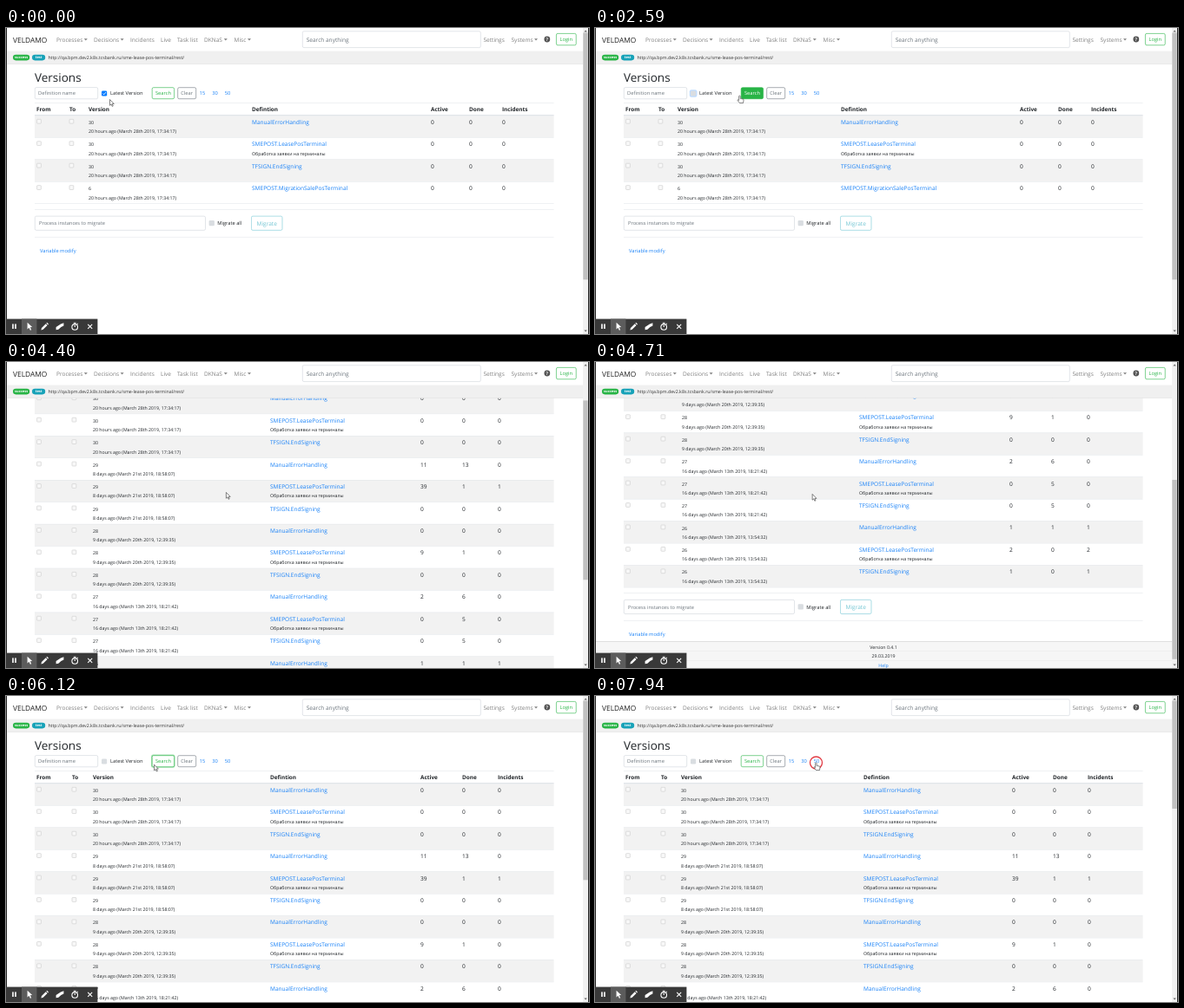
An HTML page that plays this animation: 671x353 px, repeating every 8000 ms.

```html
<!DOCTYPE html>
<html lang="en">
<head>
<meta charset="utf-8">
<title>Versions</title>
<style>
html, body { margin: 0; width: 100%; height: 100%; overflow: hidden; background: #fff; }
svg { display: block; width: 671px; height: 353px; font-family: "Open Sans", "Noto Sans", sans-serif; text-rendering: geometricPrecision; }
</style>
</head>
<body>
<svg id="stage" viewBox="0 0 671 353"></svg>
<script>
const stage = document.getElementById('stage');
const LOOP = 8000;
const INK = '#212529', MUTED = '#6c757d', NAV = '#808080', BLUE = '#1a82f7', GREEN = '#28b446', TEAL = '#17a2b8', LINE = '#dee2e6';
const LG = 6.55, MD = 5.73, SM = 5.25;
const ROW = 25.45, SHORT = 15.05, TOP = 100.7;

// Screen refreshes: runs of evenly spaced steps [first, last, count].
const runs = [[0, 0, 1], [100, 160, 2], [430, 430, 1], [1090, 1090, 1], [1940, 2930, 7], [3080, 4100, 8],
  [4240, 5150, 7], [5380, 6400, 8], [6600, 7610, 8], [7790, 7940, 2]];
const steps = runs.flatMap(([a, b, n]) => Array.from({ length: n }, (_, i) => n > 1 ? Math.round(a + (b - a) * i / (n - 1)) : a));

const cursorKeys = [[0, 119.5, 82.5], [100, 140, 120], [160, 162, 161], [430, 113, 76], [2105, 113, 76], [2430, 166, 78],
  [2590, 184, 77], [3080, 183, 77], [3370, 200, 95], [3810, 256, 148], [4100, 256.5, 148.5], [4710, 250, 152.5],
  [5150, 252, 158], [5380, 260.5, 176.5], [5680, 255, 165], [5980, 195, 98], [6120, 168.5, 77.5], [6400, 234, 76],
  [6600, 240, 76], [7610, 240, 76], [7790, 254.5, 77], [8000, 254.5, 77]];
const scrollKeys = [[4240, 0], [4400, 70], [4550, 170], [4700, 224.5], [4870, 224.5], [5010, 185], [5150, 105], [5380, 18], [5530, 0]];
const clicks = [1940, 2770, 6600, 7790];

const views = {
  latest: { cols: [35, 73, 95, 283, 489, 533, 571], rows: 4, dates: true },
  plain: { cols: [35, 89, 121, 195, 426, 489, 544], rows: 15 },
  full: { cols: [35, 76, 100, 304, 477, 525, 566], rows: 15, dates: true },
  plainLong: { cols: [35, 89, 121, 195, 426, 489, 544], rows: 30 },
  fullLong: { cols: [35, 76, 99, 309, 480, 527, 567], rows: 30, dates: true }
};
const heads = ['From', 'To', 'Version', 'Defintion', 'Active', 'Done', 'Incidents'];
const names = ['ManualErrorHandling', 'SMEPOST.LeasePosTerminal', 'TFSIGN.EndSigning'];
const dates = ['20 hours ago (March 28th 2019, 17:34:17)', '8 days ago (March 21st 2019, 18:58:07)',
  '9 days ago (March 20th 2019, 12:39:35)', '16 days ago (March 13th 2019, 18:21:42)', '16 days ago (March 13th 2019, 13:54:32)'];
const counts = { 3: [11, 13, 0], 4: [39, 1, 1], 7: [9, 1, 0], 9: [2, 6, 0], 10: [0, 5, 0], 11: [0, 5, 0], 12: [1, 1, 1], 13: [2, 0, 2], 14: [1, 0, 1] };

function track(keys, t) {
  if (t <= keys[0][0]) return keys[0].slice(1);
  for (let i = 1; i < keys.length; i++) {
    const a = keys[i - 1], b = keys[i];
    if (t <= b[0]) return a.slice(1).map((v, k) => v + (b[k + 1] - v) * (t - a[0]) / (b[0] - a[0]));
  }
  return keys[keys.length - 1].slice(1);
}

// y is the middle of the capitals.
const text = (x, y, s, size = LG, fill = INK, more = '') =>
  `<text x="${x}" y="${(y + size * .36).toFixed(2)}" font-size="${size}" fill="${fill}" ${more}>${s}</text>`;
const mid = (x, y, s, size, fill, more = '') => text(x, y, s, size, fill, 'text-anchor="middle" ' + more);
const rect = (x, y, w, h, fill, more = '') => `<rect x="${x}" y="${y}" width="${w}" height="${h}" fill="${fill}" ${more}/>`;
const path = (d, fill, more = '') => `<path d="${d}" fill="${fill}" ${more}/>`;
const outline = (x, y, w, h, color, fill = '#fff', r = 1.6) => rect(x, y, w, h, fill, `rx="${r}" stroke="${color}" stroke-width=".6"`);
const hline = (y, h = .5, color = LINE) => rect(33, y, 597.5, h, color);
const caret = (x, y) => path(`M${x - 2} ${y - 1}h4l-2 2.2z`, NAV);
const tick = (x, y) => outline(x - 2.4, y - 2.4, 4.8, 4.8, '#c9c9c9', '#f8f8f8', .7);

function button(x, y, w, h, label, color, size, fill = '#fff') {
  return outline(x, y, w, h, color, fill) + mid(x + w / 2, y + h / 2, label, size, fill === '#fff' ? color : '#fff');
}

function table(view) {
  const c = view.cols, latest = view === views.latest;
  let y = TOP, out = hline(86, .5) + heads.map((s, i) => text(c[i], 93.3, s, 6.4, INK, 'font-weight="700"')).join('');
  for (let i = 0; i < view.rows; i++) {
    const old = latest && i === 3, lease = i % 3 === 1, line = y + 7.7;
    const group = latest ? 0 : Math.floor(i / 3);
    const h = view.dates || lease ? ROW : SHORT;
    if (i % 2 === 0) out += rect(33, y, 597.5, h, '#f2f2f2');
    out += hline(y, .45) + tick(38, line - .7) + tick(c[1] + 2.4, line - .7);
    out += text(c[2], line + .5, old ? 6 : 30 - group, SM);
    if (view.dates) out += text(c[2], y + 18.6, dates[Math.min(group, 4)], SM);
    out += text(c[3], line, old ? 'SMEPOST.MigrationSalePosTerminal' : names[i % 3], LG, BLUE);
    if (lease) out += text(c[3], y + 18.6, 'Обработка заявки на терминалы', SM);
    const nums = view.dates && !latest && counts[i] || [0, 0, 0];
    out += nums.map((n, k) => text(c[4 + k], line, n)).join('');
    y += h;
  }
  return { end: y, svg: out + hline(TOP - .5, .9) };
}

function filters(t) {
  const checked = t < 2105, ring = t >= 2105 && t < 2930;
  const focus = t >= 2930 && t < 6700, filled = t >= 2430 && t < 4240;
  let out = text(33, 57.6, 'Versions', 13.5, INK, 'font-weight="500"');
  out += outline(33.3, 68.6, 72.4, 13.2, '#ced4da') + text(37, 75.3, 'Definition name', MD, MUTED);
  if (ring) out += rect(108.8, 71.2, 8.6, 8.6, '#bfdcff', 'rx="2"');
  out += rect(110, 72.4, 6.2, 6.2, checked ? '#007bff' : '#d9dde1', 'rx="1.4"');
  if (checked) out += path('M111.4 75.5l1.3 1.3 2.3-2.7', 'none', 'stroke="#fff" stroke-width=".9"');
  out += text(120, 75.3, 'Latest Version', MD);
  if (focus) out += rect(167, 67.6, 27.6, 15.2, '#a5dfb1', 'rx="2.4"');
  out += button(168.2, 68.7, 25.4, 13, 'Search', GREEN, MD, filled ? GREEN : '#fff');
  out += button(197.7, 68.7, 21, 13, 'Clear', MUTED, MD);
  return out + [15, 30, 50].map((n, i) => text(222.8 + i * 14.5, 75.3, n, MD, BLUE)).join('');
}

function below(end, footer) {
  let out = hline(end, .5) + hline(end + 6.6, .5);
  out += outline(33.3, end + 14.6, 196.2, 16.2, '#ced4da') + text(38, end + 22.9, 'Process instances to migrate', MD, MUTED);
  out += rect(233.6, end + 19.5, 6.3, 6.3, '#d9dde1', 'rx="1.2"') + text(243.3, end + 22.8, 'Migrate all', MD);
  out += `<g opacity=".6">${button(282.4, end + 14.6, 35.6, 16.2, 'Migrate', TEAL, LG)}</g>`;
  out += hline(end + 38.4, .5) + text(39, end + 54.2, 'Variable modify', MD, BLUE);
  out += rect(1, footer, 663, 40, '#f6f6f6') + rect(1, footer, 663, .6, '#cfcfcf');
  ['Version 0.4.1', '29.03.2019', 'Help'].forEach((s, i) => {
    out += mid(332, footer + 6.6 + i * 10.5, s, SM, i === 2 ? BLUE : INK);
    if (i) out += rect(1, footer + .8 + i * 10.5, 663, .4, '#e2e2e2');
  });
  return out;
}

function topBar() {
  let out = rect(0, 0, 664, 27, '#fff') + rect(0, 26.6, 664, 15, '#f0f0f0') + rect(0, 41.2, 664, .5, '#dcdcdc');
  out += text(8, 13.6, 'VELDAMO', 8.4, '#222');
  const items = [[58, 'Processes', 91.8], [101, 'Decisions', 133.6], [143, 'Incidents'], [178, 'Live'], [197, 'Task list'],
    [228, 'DKNaS', 252.8], [262.5, 'Misc', 280], [549.5, 'Settings'], [581.5, 'Systems', 610]];
  for (const [x, s, arrow] of items) out += text(x, 13.3, s, LG, NAV) + (arrow ? caret(arrow, 13.2) : '');
  out += outline(341.3, 3.8, 205, 18.8, '#ced4da') + text(345.7, 13.5, 'Search anything', LG, MUTED);
  out += `<circle cx="622.8" cy="13" r="3.4" fill="#555"/>` + mid(622.8, 13, '?', 5.2, '#fff', 'font-weight="700"');
  out += button(633.4, 6.4, 22.8, 13.4, 'Login', GREEN, MD);
  out += rect(8, 30.8, 19.2, 6.6, GREEN, 'rx="3.3"') + mid(17.6, 34, 'success', 4, '#fff', 'font-weight="700"');
  out += rect(30, 30.8, 15.2, 6.6, TEAL, 'rx="3.3"') + mid(37.6, 34, 'test', 4, '#fff', 'font-weight="700"');
  return out + text(48.4, 34.2, 'http://qa.bpm.dev2.k8s.tcsbank.ru/sme-lease-pos-terminal/rest/', SM, '#333');
}

function scrollbar(y, height) {
  const k = 338 / height;
  return rect(664, 0, 6, 353, '#f1f1f1') + rect(664.3, 5.5 + y * k, 5.4, 353 * k, '#c1c1c1') +
    path('M665.4 4.6h3.4l-1.7-2zM665.4 348.4h3.4l-1.7 2z', '#666');
}

function recorder() {
  const white = '#fff', stroke = 'stroke="#fff" stroke-width="1.1"';
  return rect(0, 335.6, 105.4, 17.4, '#393939') + rect(18, 335.6, 17.4, 17.4, '#5c5c5c') +
    rect(7.2, 341.4, 1.6, 5.6, white) + rect(10.2, 341.4, 1.6, 5.6, white) +
    path('M24.6 339.8v7.6l1.9-1.6 1.4 3 1.3-.6-1.4-2.9 2.4-.2z', white) +
    path('M40.4 348.4l.6-2.4 4.8-4.8 1.8 1.8-4.8 4.8zM46.4 340.6l.8-.8 1.8 1.8-.8.8z', white) +
    path('M57.6 348.2v-3.2l5.4-3.4 3.4-1.4v3.4l-3 1.4-3 2.8z', white) +
    `<circle cx="79.2" cy="344.9" r="3.3" fill="none" ${stroke}/>` +
    path('M77.8 340.2h2.8M79.2 345v-2.2M81.8 341.7l.9-.9', 'none', stroke) +
    path('M94.2 341.8l5 5M99.2 341.8l-5 5', 'none', stroke);
}

function pointer(t) {
  const [x, y] = track(cursorKeys, t);
  const hand = (t >= 2430 && t < 3225) || t >= 6270;
  let out = '';
  const click = clicks.find(c => t >= c && t < c + 300);
  if (click !== undefined) {
    const late = steps.indexOf(t) > steps.indexOf(click);
    if (steps.indexOf(t) <= steps.indexOf(click) + 1)
      out += `<circle cx="${x}" cy="${y}" r="${late ? 7 : 14.5}" fill="none" stroke="#e23b44" stroke-width="1.3" opacity="${late ? 1 : .45}"/>`;
  }
  const shape = hand
    ? 'M-.9 .6q.9-1 1.6 0v2.8l3 .6q.9.3.8 1.2l-.5 3.4h-4l-2.4-3q-.2-1 .7-.8l.8.7z'
    : 'M0 0v6.8l1.6-1.4 1.1 2.5 1.1-.5-1.1-2.4h2.1z';
  return out + path(shape, '#fff', `transform="translate(${x.toFixed(2)} ${y.toFixed(2)})" stroke="#333" stroke-width=".6"`);
}

function pick(t) {
  if (t < 3225) return views.latest;
  if (t < 4240) return views.plain;
  if (t < 6890) return views.full;
  return t < 7450 ? views.plainLong : views.fullLong;
}

function draw(t) {
  const { end, svg } = table(pick(t));
  const footer = Math.max(end + 62.5, 387), [scroll] = track(scrollKeys, t);
  stage.innerHTML = rect(0, 0, 671, 353, '#fff') +
    `<g transform="translate(0 ${-scroll})">${filters(t)}${svg}${below(end, footer)}</g>` +
    topBar() + scrollbar(scroll, footer + 32) + rect(0, 0, 1, 353, '#222') + rect(670, 0, 1, 353, '#222') +
    recorder() + pointer(t);
}

let shown = -1;
function frame(now) {
  const t = now % LOOP;
  const step = steps.filter(s => s <= t).pop();
  if (step !== shown) draw(shown = step);
  requestAnimationFrame(frame);
}
draw(shown = 0);
requestAnimationFrame(frame);
</script>
</body>
</html>
```
